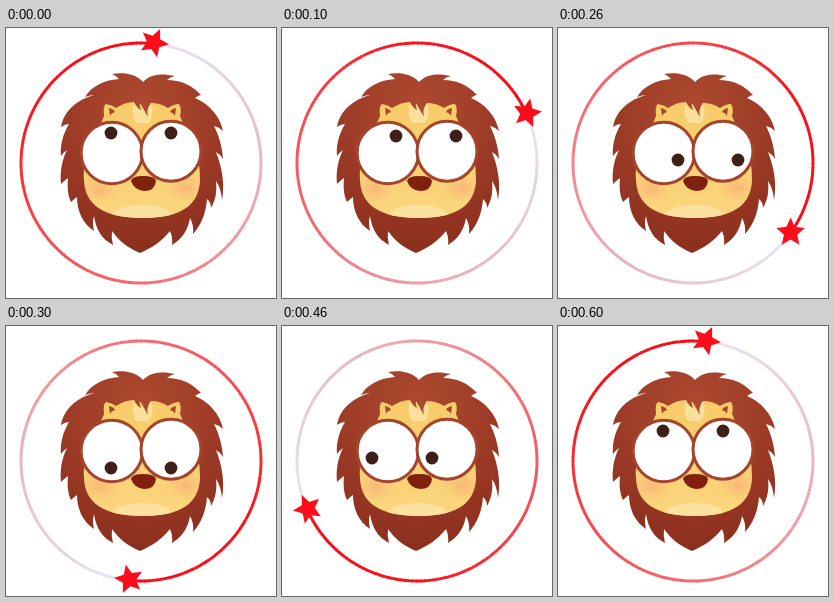
These frames come from a looping animation (270 px wide and 270 px high, 700 ms). An HTML page:

```html
<!DOCTYPE html>
<html lang="en">
<head>
<meta charset="utf-8">
<title>Lion loader</title>
<style>
  html, body { margin: 0; width: 100%; height: 100%; overflow: hidden; background: #fff; }
  svg { display: block; width: 100vw; height: 100vh; }
</style>
</head>
<body>
<svg viewBox="0 0 270 270">
  <defs>
    <radialGradient id="mane" gradientUnits="userSpaceOnUse" cx="136" cy="80" r="145">
      <stop offset="0" stop-color="#ad4a2f"/>
      <stop offset=".45" stop-color="#9f3d28"/>
      <stop offset="1" stop-color="#8b2f1d"/>
    </radialGradient>
    <linearGradient id="skin" x1="0" y1="0" x2="0" y2="1">
      <stop offset="0" stop-color="#f8cb68"/>
      <stop offset="1" stop-color="#fbd67e"/>
    </linearGradient>
    <radialGradient id="blush">
      <stop offset="0" stop-color="#f7a878" stop-opacity=".65"/>
      <stop offset="1" stop-color="#f8b878" stop-opacity="0"/>
    </radialGradient>
    <clipPath id="faceClip"><use href="#face"/></clipPath>
  </defs>

  <g id="spinner">
    <g id="ring" fill="none" stroke-width="2.9"/>
  </g>
  <polygon id="star" fill="#fc0d1b"/>

  <path fill="url(#mane)" d="M137 54
    C130 46 118 44 106 46 Q111 48 113 51
    C97 52 85 59 79 69 Q84 67 89 67
    C72 71 58 82 55 99 Q59 96 63 96
    C57 106 54 117 55 128 Q58 124 61 122
    C55 134 54 146 55 156 Q59 152 62 150
    C61 160 62 168 65 174 Q68 171 71 169
    C71 183 77 196 88 203 Q86 195 88 188
    C90 202 96 211 107 217 Q105 210 106 203
    C113 213 122 220 134 225
    C146 220 156 213 164 203 Q167 210 166 217
    C176 211 182 202 184 190 Q188 197 187 206
    C196 196 200 184 201 171 Q205 174 205 180
    C210 171 211 163 210 153 Q215 160 216 172
    C219 156 216 139 210 124 Q214 126 217 131
    C216 118 213 108 208 98 Q213 99 217 103
    C214 88 203 76 189 70 Q193 67 195 67
    C186 57 174 52 161 52 Q164 49 169 48
    C156 45 144 46 137 54Z"/>

  <path id="face" fill="url(#skin)" d="M98 88 Q97 77 100 76 Q106 77 110 80
    Q119 74 128 74 Q130 79 135 82 Q133 78 134 75 Q139 84 142 89
    Q140 81 145 75 Q154 75 162 80 Q168 76 173 76 Q176 80 174 88
    L192 130 Q194 140 194 152 C193 176 177 190 137 190
    C96 190 79 176 78 152 Q77 142 80 130Z"/>
  <g clip-path="url(#faceClip)">
    <path fill="#fbe09b" d="M128 74 Q130 80 136 83 Q134 78 134 75 Q139 83 142 90 Q140 81 145 75 Q149 85 143 95 H130 Q124 85 128 74Z"/>
    <ellipse cx="93" cy="161" rx="21" ry="15" fill="url(#blush)"/>
    <ellipse cx="180" cy="160" rx="21" ry="15" fill="url(#blush)"/>
    <ellipse cx="136" cy="188" rx="30" ry="11" fill="#fce1a0"/>
  </g>
  <path fill="#a6452a" d="M103 80 Q108 81 109 84 Q105 85 104 88Z M170 80 Q165 81 164 84 Q168 85 169 88Z"/>

  <g fill="#fff" stroke="#a5432b" stroke-width="3">
    <circle cx="105.8" cy="125" r="30.7"/>
    <circle cx="165" cy="123.2" r="30"/>
  </g>
  <path fill="#80210f" d="M125 153 Q126 148 137 148 Q149 148 150 153 Q149 163 138 163 Q128 162 125 153Z"/>
  <g id="pupils" fill="#3f2019">
    <circle r="6.4"/>
    <circle r="6.4" cx="60"/>
  </g>
</svg>
<script>
  const CENTER = 135, RADIUS = 120, START = 6, STEP_MS = 100, STEPS = 7;
  const byId = id => document.getElementById(id);
  const polar = (deg, r) => {
    const a = deg * Math.PI / 180;
    return [r * Math.sin(a), -r * Math.cos(a)];
  };
  const onRing = deg => polar(deg, RADIUS).map(v => v + CENTER);

  // Tail colours by degrees behind the star
  const tail = [
    [0, [252, 10, 22]], [70, [250, 20, 28]], [130, [247, 74, 80]],
    [190, [244, 110, 116]], [235, [240, 150, 156]], [280, [233, 186, 194]],
    [325, [230, 212, 224]], [360, [232, 232, 250]]
  ];
  function tailColor(deg) {
    const i = tail.findIndex(([at]) => at > deg);
    const [a, from] = tail[i - 1], [b, to] = tail[i];
    const mix = from.map((v, k) => Math.round(v + (to[k] - v) * (deg - a) / (b - a)));
    return `rgb(${mix})`;
  }

  function buildRing() {
    const size = 2;
    for (let d = 360 - size; d >= 0; d -= size) {
      const arc = document.createElementNS("http://www.w3.org/2000/svg", "path");
      const from = onRing(-d - size), to = onRing(-d + 0.4);
      arc.setAttribute("d", `M${from} A${RADIUS} ${RADIUS} 0 0 1 ${to}`);
      arc.setAttribute("stroke", tailColor(d + size / 2));
      byId("ring").append(arc);
    }
  }

  function buildStar() {
    const points = Array.from({ length: 10 }, (_, i) => {
      const [x, y] = polar(i * 36 + 18, i % 2 ? 7 : 15);
      return [x, y - RADIUS];
    });
    byId("star").setAttribute("points", points.join(" "));
  }

  // Left pupil position per step; the right one follows beside it
  const gaze = [[105, 105], [114, 108], [120, 132], [105, 142], [90, 132], [90, 111]];

  function render(ms) {
    const step = Math.floor(ms / STEP_MS) % STEPS % gaze.length;
    const angle = START + step * 60;
    byId("pupils").setAttribute("transform", `translate(${gaze[step]})`);
    byId("spinner").setAttribute("transform", `rotate(${angle} ${CENTER} ${CENTER})`);
    // The star's orbit sits slightly off the ring's centre
    byId("star").setAttribute("transform", `translate(135.5 134) rotate(${angle})`);
  }

  buildRing();
  buildStar();
  const start = performance.now();
  function tick() {
    render(performance.now() - start);
    requestAnimationFrame(tick);
  }
  tick();
</script>
</body>
</html>
```
